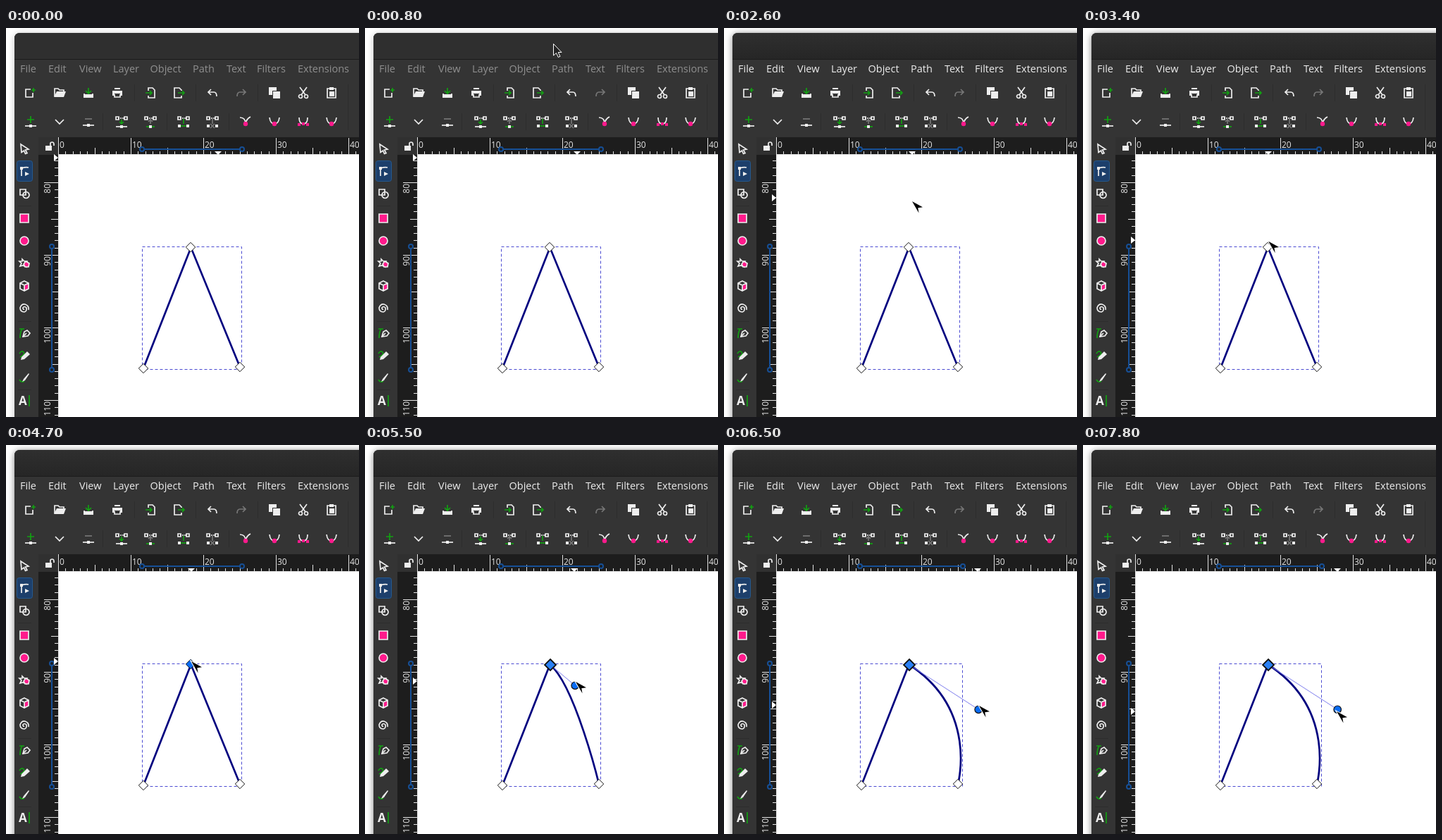
Write an HTML page that moves like this. It is 501x552 px and loops after 8000 ms.

```html
<!DOCTYPE html>
<html lang="en">
<head>
<meta charset="utf-8">
<title>Curving a corner</title>
<style>
html, body { margin: 0; width: 100%; height: 100%; overflow: hidden; background: #fff; }
svg { display: block; width: 501px; height: 552px; }
text { font-family: "Open Sans", "Noto Sans", sans-serif; }
.icon { fill: none; stroke: #eee; stroke-width: 1.7; }
.icon .s { fill: #eee; stroke: none; }
.icon .g { stroke: #12a012; }
.icon .p { fill: #ff1a8c; stroke: none; }
.icon .d { stroke: #777; }
</style>
</head>
<body>
<svg viewBox="0 0 501 552">
  <defs>
    <filter id="blur" x="-10%" y="-10%" width="120%" height="120%"><feGaussianBlur stdDeviation="5"/></filter>
    <linearGradient id="bar" x2="0" y2="1"><stop stop-color="#2f2f2f"/><stop offset="1" stop-color="#262626"/></linearGradient>
    <g id="joint">
      <path d="M-5-5H5" stroke-dasharray="2 1"/>
      <path class="s" d="M-8-7h4v4h-4zM4-7h4v4h-4z"/>
    </g>
    <path id="arrow" d="M-5-6L6 1L1.5 2L4 6.5L1.5 7.5L-.5 3L-4 5.5Z"/>
  </defs>

  <rect id="shadow" x="12" y="8" width="520" height="570" rx="8" filter="url(#blur)"/>
  <path d="M12 552V15Q12 7 20 7H501V552Z" fill="#343434"/>
  <path id="title" d="M12 44V15Q12 7 20 7H501V44Z"/>
  <path d="M12 44.5H501" stroke="#1c1c1c"/>
  <g id="menu" font-size="14.5"></g>
  <path d="M182.5 80V104M269.5 80V104M357.5 80V104M137.5 121V145M228.5 121V145M316.5 121V145M485.5 80V145M17 252.5H36M17 416.5H36M17 513.5H36" stroke="#2d2d2d"/>
  <rect x="46" y="155" width="455" height="397" fill="#1d1d1d"/>
  <rect x="46" y="155" width="28" height="25" fill="#303030"/>
  <rect x="74" y="180" width="427" height="372" fill="#fff"/>

  <g id="rulers" fill="#e4e4e4" font-size="12">
    <path id="ticks" fill="none" stroke="#e4e4e4" shape-rendering="crispEdges"/>
  </g>
  <g fill="none" stroke="#164f96" stroke-width="2">
    <path id="spanX"/>
    <circle cx="193" cy="172" r="3"/><circle id="spanEnd" cy="172" r="3"/>
    <path d="M65 313V482"/><circle cx="65" cy="310" r="3"/><circle cx="65" cy="485" r="3"/>
  </g>
  <path id="markX" d="M-5-5H5L0 0Z" fill="#fff"/>
  <path id="markY" d="M-6-5V5L0 0Z" fill="#fff"/>

  <rect x="15.5" y="188.5" width="22" height="29" rx="3" fill="#1d3f6b" stroke="#24598f"/>
  <g id="icons"></g>

  <rect id="bounds" x="193.5" y="310.5" height="174" fill="none" stroke="#4b4bd2" stroke-dasharray="4 3"/>
  <path id="shape" fill="none" stroke="#00007f" stroke-width="2.7"/>
  <path id="lever" stroke="#8080ee"/>
  <g stroke="#111" fill="#fff">
    <path d="M195 476.3l6.7 6.7l-6.7 6.7l-6.7-6.7z"/>
    <path d="M332 474.3l6.7 6.7l-6.7 6.7l-6.7-6.7z"/>
    <path id="corner"/>
    <circle id="handle" r="5.3" stroke-width="1.2"/>
  </g>
  <path id="pointer" d="M.5.5V17L4.5 13.5L7.3 19.5L10 18.3L7.2 12.5H12Z" fill="#222" stroke="#fff"/>
  <path id="nib" d="M0 0L15 8.3L8.3 9.3L9.5 16.5Z" fill="#000" stroke="#fff" stroke-width="2" paint-order="stroke"/>
</svg>
<script>
const $ = id => document.getElementById(id);
const set = (id, attrs) => { for (const k in attrs) $(id).setAttribute(k, attrs[k]); };
const move = (id, x, y) => set(id, { transform: `translate(${x} ${y})` });
const show = (id, on) => { $(id).style.display = on ? '' : 'none'; };
const add = (id, markup) => $(id).insertAdjacentHTML('beforeend', markup);

const menu = { File: 20, Edit: 60, View: 104, Layer: 152, Object: 204.5, Path: 265, Text: 313, Filters: 356, Extensions: 414 };
for (const name in menu) add('menu', `<text x="${menu[name]}" y="63">${name}</text>`);

// Rulers: ten units every 103 px
let ticks = '';
for (let i = 0; i <= 41; i++) {
  const len = i % 10 ? (i % 5 ? 5 : 10) : 24;
  ticks += `M${Math.round(74 + i * 10.3) + .5} 180v${-len}`;
  if (i % 10 === 0) add('rulers', `<text x="${76 + i * 10.3}" y="170">${i}</text>`);
}
for (let i = -3; i <= 32; i++) {
  const len = i % 10 ? (i % 5 ? 5 : 10) : 20;
  const y = Math.round(219 + i * 10.3);
  ticks += `M74 ${y + .5}h${-len}`;
  if (i % 10 === 0) add('rulers', `<text transform="translate(63 ${y + 2}) rotate(-90)" text-anchor="end">${80 + i}</text>`);
}
set('ticks', { d: ticks + 'M74.5 155V552M74 179.5H501' });

const path = (d, cls = '') => `<path class="${cls}" d="${d}"/>`;
const icon = (x, y, ...parts) => add('icons', `<g class="icon" transform="translate(${x} ${y})">${parts.join('')}</g>`);
const joint = '<use href="#joint"/>';
const page = path('M-1-5H-6V6H4V2');

// Command bar
icon(34, 92, path('M1-5H-6V6H4V0'), path('M5-7V-1M2-4H8', 'g'));
icon(76, 92, path('M-7 5V-6H-2L0-4H6V-2'), path('M-4-2H9L6 6H-8Z', 's'));
icon(117, 92, path('M-6 1V6H6V1'), path('M-7 2H7V7H-7Z', 's'), path('M0-7V1M-4-3L0 1L4-3', 'g'));
icon(158, 92, path('M-7-3H7V4H4V1H-4V4H-7ZM-4-7H4V-5H-4Z', 's'), path('M-4 2V6H4V2'));
icon(206, 92, path('M-4-3V-7H2L5-4V7H-4V4'), path('M-8 0H1M-2-3L1 0L-2 3', 'g'));
icon(245, 92, path('M4-3V-4L1-7H-6V7H4V4'), path('M-1 0H8M5-3L8 0L5 3', 'g'));
icon(293, 92, path('M-2-5L-6-1L-2 3M-6-1H2Q6-1 6 5'));
icon(334, 92, path('M2-5L6-1L2 3M6-1H-2Q-6-1-6 5', 'd'));
icon(381, 92, path('M-8-8H3V-3H-3V3H-8ZM-2-2H8V8H-2Z', 's'));
icon(422, 92, path('M-5-8L3 3M5-8L-3 3'), '<circle cx="-4" cy="5" r="2.5"/><circle cx="4" cy="5" r="2.5"/>');
icon(462, 92, path('M-2-6H-6V7H6V-6H2'), path('M-3-8H3V-4H-3ZM-3-2H4V5H-3Z', 's'));

// Node bar
icon(35, 133, path('M0-8V2M-5-3H5', 'g'), path('M-8 6H8'), path('M-2 4H2V8H-2Z', 's'));
icon(76, 133, path('M-6-3L0 3L6-3'));
icon(117, 133, path('M-5-4H5', 'd'), path('M-8 5H8'), path('M-2 3H2V7H-2Z', 's'));
icon(164, 133, joint, path('M0-3V3M-3 0L0 3L3 0', 'g'), path('M-8 7H8'), path('M-2 5H2V9H-2Z', 's'));
icon(205, 133, joint, path('M0 3V-3M-3 0L0-3L3 0', 'd'), path('M-6 7H6', 'g'), path('M-2 5H2V9H-2Z', 's'));
icon(252, 133, joint, path('M0-4V3', 'g'), path('M-8 4h4v4h-4zM4 4h4v4h-4z', 's'), path('M-4 6H4', 'g'));
icon(293, 133, joint, path('M0-4V3', 'd'), path('M-8 4h4v4h-4zM4 4h4v4h-4z', 's'), path('M-3 3L3 9M3 3L-3 9', 'd'));
const dot = '<circle class="p" cy="3" r="3.2"/>';
icon(340, 133, path('M-8-6Q0-6 0 3Q1-4 7-7'), dot);
icon(381, 133, path('M-7-6Q-6 3 0 3Q6 3 7-6'), dot);
icon(422, 133, path('M-6-6Q-6 3 0 3Q6 3 6-6'), path('M-8 2h4v4h-4zM4 2h4v4h-4zM-2 1h4v4h-4z', 'p'));
icon(462, 133, path('M-7-6Q-6 3 0 3Q6 3 7-6'), dot);

// Lock and tool box
icon(61, 168, path('M-5-1H4V6H-5Z', 's'), path('M2-1V-4Q2-6 4.500-6Q7-6 7-3V-1'));
icon(26, 171, '<use href="#arrow"/>');
icon(26, 203, path('M-6-6h4v4h-4z', 's'), path('M-4-4V7M-4-4Q2-6 6-5', ''), path('M1 1L7 4L1 7Z', 's'));
icon(26, 235, path('M-6-6H2V2H-6Z'), '<circle cx="2.500" cy="2" r="4.500"/>');
icon(26, 270, path('M-6-6H6V6H-6Z', 'p'), path('M-6-6H6V6H-6Z'));
icon(26, 302, '<circle class="p" r="6"/><circle r="6"/>');
icon(26, 334, path('M-3-6L0-3L4-3L2 1L3 5L-2 3L-6 4L-4 0L-7-3L-3-3Z'), path('M2-3L7 0L6 5L1 5L-1 1Z', 'p'), path('M2-3L7 0L6 5L1 5L-1 1Z'));
icon(26, 366, path('M0 0L6-3V4L0 7Z', 'p'), path('M0-7L6-4V4L0 7L-6 4V-4ZM-6-4L0-1L6-4M0-1V7'));
icon(26, 398, path('M0 1Q-2 2-2-1Q0-4 3-1Q4 4 0 5Q-6 5-6-1Q-4-7 1-6Q7-4 6 2'));
icon(26, 433, path('M-6 7Q-6-2-3-6M-7-6H0', 'g'), path('M-2 5L0-2L4-4L8 0L5 4Z'), path('M-2 5L3 0'));
icon(26, 465, path('M-7-3Q-4-8-1-5T-6 2', 'g'), path('M-5 6L-4 2L4-6L8-2L0 5Z', 's'));
icon(26, 497, path('M-7 2Q-4 7 0 4', 'g'), path('M-3 5L-1 1L6-7L7-6L1 3Z', 's'));
icon(26, 529, '<text class="s" x="-8" y="6" font-size="17" font-weight="700">A</text>', path('M7-8V8', 'g'));

// Pointer tip: time, x, y, eased
const route = [
  [500, 264, 1], [800, 267, 22], [1800, 267, 22], [2700, 267, 254, 1], [3500, 263, 305, 1],
  [4200, 263, 305], [4700, 263, 307], [5100, 276, 319], [5500, 299, 336], [6000, 329, 353],
  [6500, 362, 370], [6700, 362, 370], [7200, 377, 428, 1], [7600, 369, 376, 1], [7800, 360, 378]
];

function tipAt(t) {
  const i = route.findIndex(k => k[0] >= t);
  if (i < 1) return (i ? route[route.length - 1] : route[0]).slice(1, 3);
  const a = route[i - 1], b = route[i];
  let u = (t - a[0]) / (b[0] - a[0]);
  if (b[3]) u *= u * (3 - 2 * u);
  return [a[1] + (b[1] - a[1]) * u, a[2] + (b[2] - a[2]) * u];
}

function curveRight(x0, x1, x3) {
  let right = x3;
  for (let u = 0; u < 1; u += .02) {
    const v = 1 - u;
    right = Math.max(right, x0 * v ** 3 + 3 * x1 * u * v * v + x3 * (3 * u * u * v + u ** 3));
  }
  return right;
}

const diamond = (x, y, r) => `M${x} ${y - r}l${r} ${r}l${-r} ${r}l${-r} ${-r}z`;

function render(time) {
  const t = Math.floor(time / 100) * 100;
  const [x, y] = tipAt(t);
  const focused = t >= 1500;
  const onCanvas = y > 180;
  const pulled = t > 4700;

  set('shadow', { opacity: t < 1500 ? .25 : t < 1600 ? .4 : .5 });
  set('title', { fill: focused ? 'url(#bar)' : '#2f2f2f' });
  set('menu', { fill: focused ? '#ececec' : '#8f8f8f' });

  show('pointer', t >= 500 && !onCanvas);
  show('nib', onCanvas);
  move('pointer', x, y);
  move('nib', x, y);
  const [mx, my] = onCanvas ? tipAt(t - 30) : [301, 184];
  move('markX', Math.round(mx), 180);
  move('markY', 74, Math.round(my));

  const [tx, ty] = tipAt(Math.min(t, 6500));
  const hx = tx - (pulled ? .8 : 0), hy = ty + 5.3;
  const bend = pulled ? `C${hx} ${hy} 332 481 332 481` : 'L332 481';
  set('shape', { d: `M195 483L262.500 311.500${bend}` });
  const right = pulled ? Math.max(334.5, Math.round(curveRight(262.5, hx, 332) + 1.7) + .5) : 334.5;
  set('bounds', { width: right - 193.5 });
  set('spanX', { d: `M196 172H${right - 2.5}` });
  set('spanEnd', { cx: right + .5 });

  const hover = Math.hypot(x - 262, y - 311) < 8;
  set('corner', {
    d: pulled ? diamond(263, 312, 8) : diamond(262, 311, 6.7),
    fill: pulled ? '#2a80f5' : hover ? '#0a6cf5' : '#fff',
    'stroke-width': pulled ? 1.8 : 1
  });
  show('handle', pulled);
  show('lever', pulled);
  move('handle', hx, hy);
  set('handle', { fill: Math.hypot(x - hx, y - hy) < 8 ? '#0a6cf5' : '#fff' });
  set('lever', { d: `M263 312L${hx} ${hy}` });
}

const start = performance.now();
function loop() {
  render((performance.now() - start) % 8000);
  requestAnimationFrame(loop);
}
loop();
</script>
</body>
</html>
```
